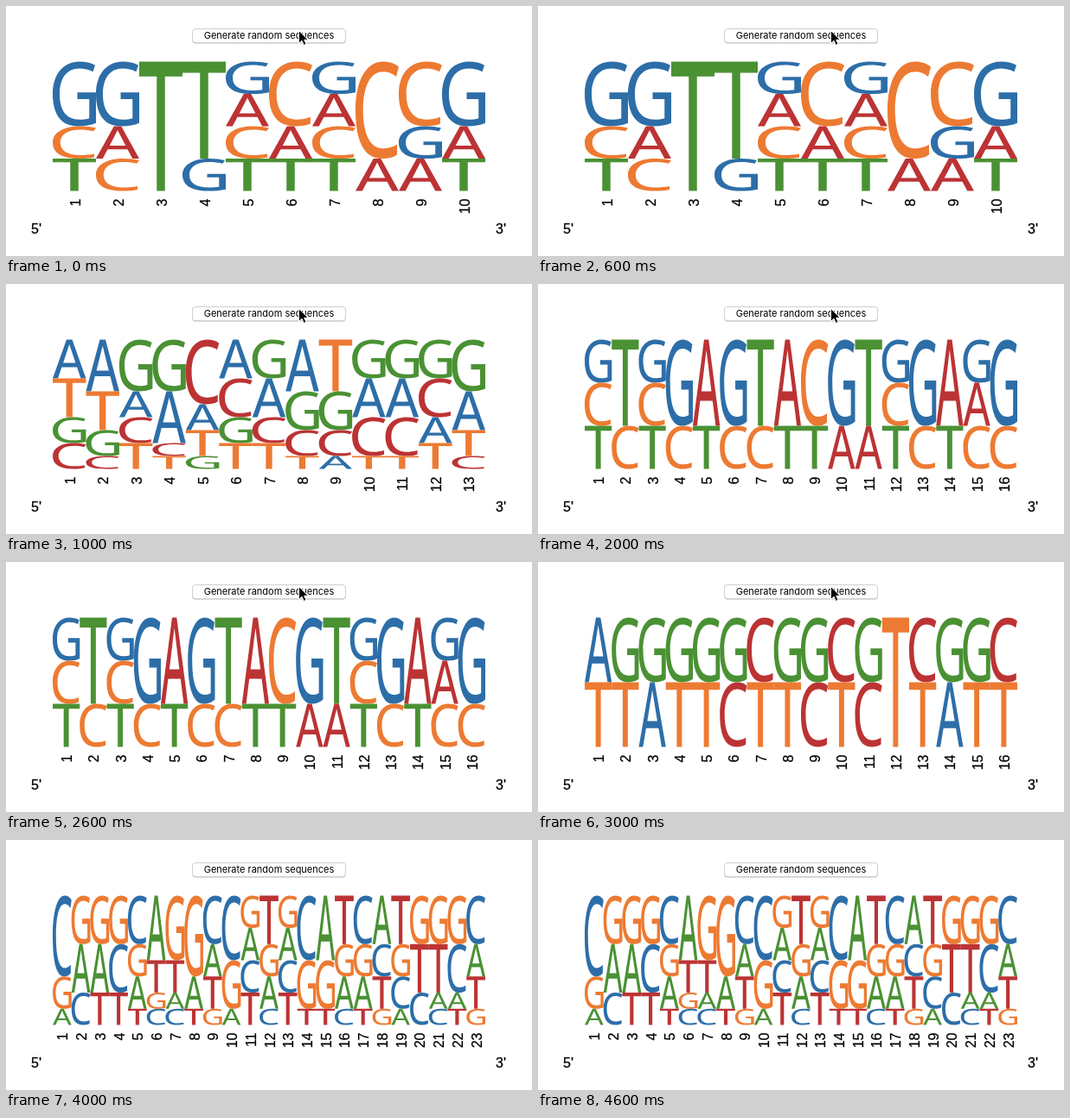
Recreate the animation shown at these times as an HTML page. Size 608x290 px, loop 5 s.

```html
<!DOCTYPE html>
<html lang="en">
<head>
<meta charset="utf-8">
<title>Sequence logo</title>
<style>
  html, body { margin: 0; width: 100%; height: 100%; overflow: hidden; background: #fff; }
  svg { display: block; }
  text { font: 16px "Liberation Sans", Arial, sans-serif; stroke: #000; stroke-width: .25px; }
  .label { font: 11px Inter, sans-serif; text-anchor: middle; stroke: none; }
  #ticks text { text-anchor: end; }
</style>
</head>
<body>
<svg width="608" height="290" viewBox="0 0 608 290">
  <rect x="215.5" y="27" width="177" height="16.5" rx="3.5" fill="#bbb"/>
  <rect x="215.5" y="26.5" width="177" height="16" rx="3.5" fill="#fff" stroke="#cfcfcf"/>
  <text class="label" x="304" y="38">Generate random sequences</text>
  <g id="logo" fill-rule="evenodd"></g>
  <g id="ticks"></g>
  <text x="29" y="264">5'</text>
  <text x="566" y="264">3'</text>
  <path id="cursor" d="M338.5 28.5V43.5L342 40.2L344.3 45.4L347 44.2L344.7 39.2H349.2Z" stroke="#fff"/>
</svg>
<script>
const LEFT = 54, TOP = 64.5, WIDTH = 500, HEIGHT = 150;
const BLUE = '#2d6ea8', ORANGE = '#ed7a32', GREEN = '#4a9134', RED = '#bc3334';

// Letter outlines in a 100 x 100 box
const GLYPHS = {
  A: 'M0 100L41.5 0H58.5L100 100H84.5L73 71H27L15.5 100ZM31.5 60H68.5L50 12Z',
  C: 'M63.5 10.5C34 10.5 17.5 26 17.5 50C17.5 75 34 89.5 63 89.5C75 89.5 86 88 96 85.5V96' +
     'C86 99 75 100 61 100C20 100 0 82 0 50C0 20 24 0 64 0C79 0 91 2 100 5.5L94 15.5' +
     'C84 12 75 10.5 63.5 10.5Z',
  G: 'M57 47.5H100V95C88 98.5 75 100 58 100C20 100 0 82 0 50C0 20 24 0 62 0C76 0 88 2 98 5.5' +
     'L93 15.5C83 12 73 10.5 61.5 10.5C32 10.5 16 26 16 50C16 76 32 89.5 61.5 89.5' +
     'C70 89.5 78 89 84.5 87.5V58H57Z',
  T: 'M0 0H100V11.5H59.5V100H40.5V11.5H0Z'
};

const warm = { A: RED, C: ORANGE, G: BLUE, T: GREEN };
const cool = { A: BLUE, C: RED, G: GREEN, T: ORANGE };
const mixed = { A: GREEN, C: BLUE, G: ORANGE, T: RED };

// Each column lists its bases from top to bottom, with counts above one
const scenes = [
  [warm, 'G2CT G2AC T4 T3G GACT C2AT GACT C3A C2GA G2AT'],
  [cool, 'A3T3G2C2 A4T3G2C G4A2C2T2 G4A4CT C5A2T2G A3C3G2T2 G3A3C2T2 ' +
         'A4G3C2T T4G3C2A G3A3C3T G3A3C3T G3C3A2T2 G4A3T2C'],
  [warm, 'GCT T2C GCT G2C A2T G2C T2C A2T C2T G2A T2A GCT G2C A2T GAC G2C'],
  [cool, 'AT GT GA GT GT GC CT GT GC CT GC T2 CT GA GT CT'],
  [mixed, 'C5G2A G3A3C2 G3A3T2 G3C3T2 C3G2A2T A4T2GC G4T2AC G5A2T C3A2T2G C4G3A ' +
          'G2A2C2T2 T3G2A2C G2A2C2T2 C4G3T A4G3T T3G2A2C C3G2A2T A3C2T2G T3G2C2A ' +
          'G3T3C2 G3T3AC G3C3AT C3A2T2G']
];

const $ = id => document.getElementById(id);

function drawColumn(column, x, width, colors) {
  const runs = [...column.matchAll(/([ACGT])(\d?)/g)].map(m => [m[1], +m[2] || 1]);
  const unit = HEIGHT / runs.reduce((sum, [, count]) => sum + count, 0);
  let y = TOP;
  return runs.map(([base, count]) => {
    const height = count * unit;
    const path = `<path d="${GLYPHS[base]}" fill="${colors[base]}" ` +
      `transform="translate(${x} ${y}) scale(${width / 100} ${height / 100})"/>`;
    y += height;
    return path;
  }).join('');
}

function draw(index) {
  const [colors, text] = scenes[index];
  const columns = text.split(' ');
  const width = WIDTH / columns.length;
  $('logo').innerHTML = columns.map((c, i) => drawColumn(c, LEFT + i * width, width, colors)).join('');
  $('ticks').innerHTML = columns.map((_, i) =>
    `<text transform="translate(${LEFT + (i + 0.5) * width + 6.5} 223.5) rotate(-90)">${i + 1}</text>`).join('');
  $('cursor').style.display = index === scenes.length - 1 ? 'none' : '';
}

let shown = -1;
function tick() {
  const index = Math.floor(performance.now() / 1000) % scenes.length;
  if (index !== shown) draw(shown = index);
  requestAnimationFrame(tick);
}
tick();
</script>
</body>
</html>
```
